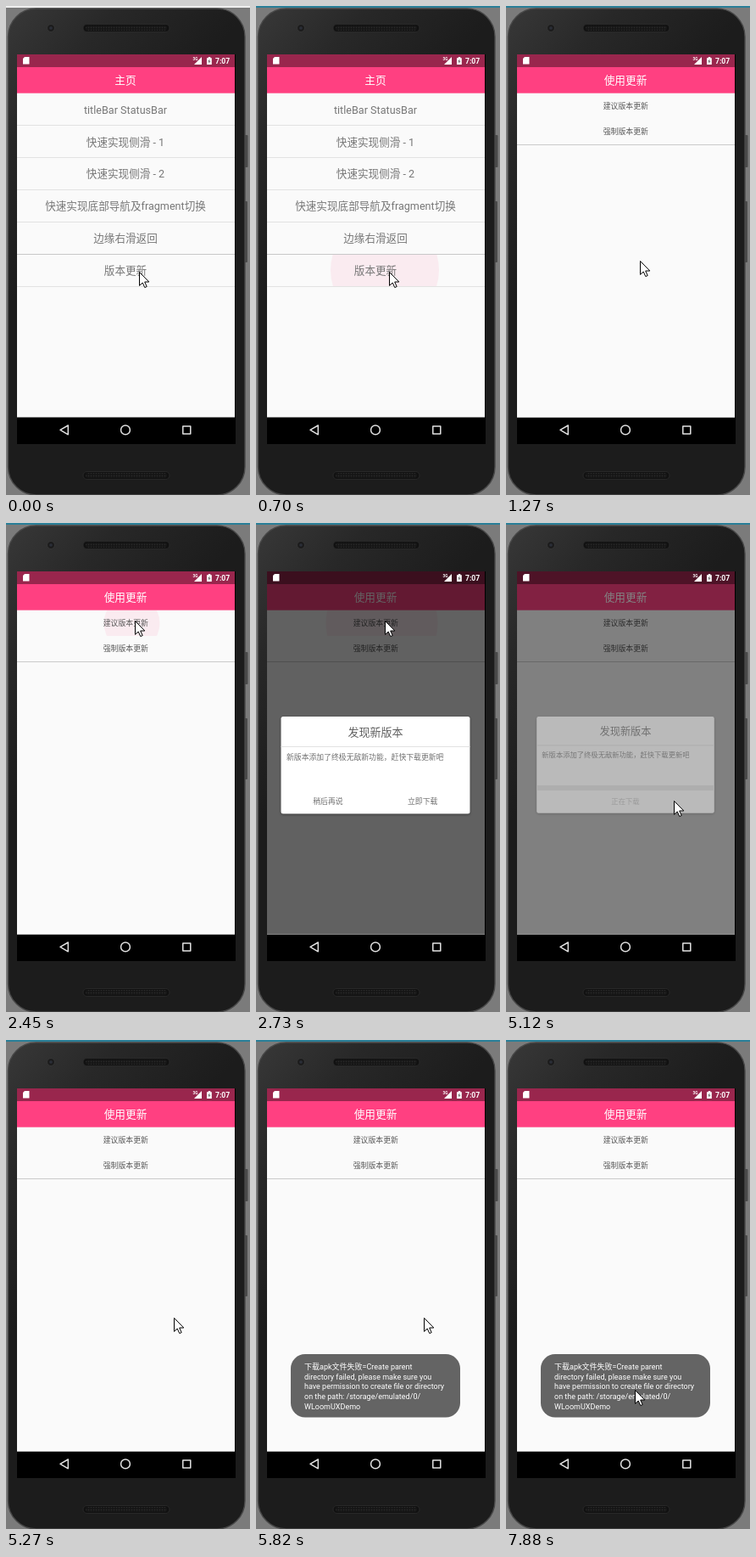
Write an HTML page that moves like this. It is 288 px wide and 576 px high and loops after 8000 ms.

```html
<!DOCTYPE html>
<html lang="zh-CN">
<head>
<meta charset="utf-8">
<title>版本更新</title>
<style>
html, body { margin: 0; width: 100%; height: 100%; overflow: hidden; background: #7b7b7b; }
svg { display: block; width: 288px; height: 576px; }
text { font-family: Roboto, 'Noto Sans CJK SC', 'Noto Sans CJK JP', 'Noto Sans CJK', sans-serif; }
.card { filter: drop-shadow(0 1px 1.5px rgba(0, 0, 0, .4)); }
</style>
</head>
<body>
<svg id="stage" viewBox="0 0 288 576" xmlns="http://www.w3.org/2000/svg"></svg>
<script>
const LOOP = 8000;
const PINK = '#ff4081';

const rect = (x, y, w, h, fill, more = '') =>
  `<rect x="${x}" y="${y}" width="${w}" height="${h}" fill="${fill}" ${more}/>`;

// Text placed by its vertical middle
const label = (str, x, mid, size, fill, more = 'text-anchor="middle"') =>
  `<text x="${x}" y="${mid + size * 0.37}" font-size="${size}" fill="${fill}" ${more}>${str}</text>`;

const speaker = y =>
  rect(91, y, 102, 9, '#111', 'rx="4.5" stroke="#2e2e2e" stroke-width=".8"') +
  rect(94, y + 1.5, 96, 6, 'url(#mesh)', 'rx="3"');

const phone = `
  ${rect(0, 0, 288, 576, '#7b7b7b')}
  ${rect(280, 152, 5.5, 38, '#4a4a4a', 'rx="1"')}
  ${rect(280, 230, 5, 72, '#4a4a4a', 'rx="1"')}
  ${rect(2.5, 3, 279.5, 573, 'url(#shell)', 'rx="33" stroke="#484848" stroke-width="1.4"')}
  <circle cx="53" cy="26" r="4.5" fill="#1c1c1c" stroke="#363636"/>
  <circle cx="53" cy="26" r="1.8" fill="#2b2f38"/>
  ${speaker(21.5)}${speaker(548.5)}
  ${rect(13, 57, 258, 459, '#000')}`;

const screen = (title, content) => `
  ${rect(13, 57, 257, 427.5, '#fafafa')}
  ${rect(13, 57, 257, 15, '#99264d')}
  ${rect(13, 72, 257, 30.7, PINK)}
  ${label(title, 141, 87.2, 12.7, '#fff', 'text-anchor="middle" font-weight="500"')}
  ${content}`;

const ripple = (id, x, y, clip) =>
  `<circle id="${id}" cx="${x}" cy="${y}" fill="${PINK}" clip-path="url(#${clip})"/>`;

const menu = ['titleBar StatusBar', '快速实现侧滑 - 1', '快速实现侧滑 - 2',
  '快速实现底部导航及fragment切换', '边缘右滑返回', '版本更新'];

const home = screen('主页', ripple('tapHome', 152, 311, 'rowHome') + menu.map((name, i) =>
  label(name, 141, 122 + i * 37.9, 12.6, '#777') +
  rect(13, 140 + i * 38, 257, 1, i === 4 ? '#c8c8c8' : '#e2e2e2')).join(''));

const update = screen('使用更新', ripple('tapUpdate', 148.5, 118, 'rowUpdate') +
  ['建议版本更新', '强制版本更新'].map((name, i) =>
    label(name, 141.3, 118 + i * 30, 8.85, '#585858')).join('') +
  rect(13, 163, 257, 1, '#cbcbcb'));

const dialog = (y, h, titleY, lineY, messageY, content) => `
  ${rect(29.5, y, 223, h, '#fff', 'rx="2.5" class="card"')}
  ${label('发现新版本', 141, titleY, 13, '#606060')}
  ${rect(29.5, lineY, 223, 1, '#e2e2e2')}
  ${label('新版本添加了终极无敌新功能，赶快下载更新吧', 36, messageY, 8.83, '#707070', '')}
  ${content}`;

const ask = dialog(228, 114.5, 246, 263, 276,
  label('稍后再说', 85, 328, 8.9, '#707070') + label('立即下载', 196.7, 328, 8.9, '#707070'));

const busy = dialog(224.4, 121, 242.6, 260, 272.3,
  rect(29.5, 310.5, 223, 6.5, '#e6e6e6') + label('正在下载', 141, 330.7, 8.9, '#bbb'));

const message = ['下载apk文件失败=Create parent', 'directory failed, please make sure you',
  'have permission to create file or directory', 'on the path: /storage/emulated/0/', 'WLoomUXDemo'];

const toast = rect(41, 370, 200, 74.5, '#646464', 'rx="17"') +
  message.map((line, i) => label(line, 57, 384.6 + i * 11.75, 9, '#fff', '')).join('');

const status = `
  <path d="M22 60H27.5V68.5H20V62Z" fill="#fff"/>
  <path d="M231 60V69H222Z" fill="#fff"/>
  ${label('3G', 220.5, 62, 4.6, '#fff', 'font-weight="700"')}
  <path d="M238.8 60H241.3V61.2H242.8V69H237V61.2H238.8Z" fill="#fff"/>
  <path d="M240.6 62.2L238.2 65.6H239.7L239.2 68L241.6 64.8H240.1Z" fill="#666"/>
  ${label('7:07', 247, 64.6, 8.6, '#fff', 'font-weight="700"')}`;

const nav = `<g fill="none" stroke="#e2e2e2" stroke-width="1.5" stroke-linejoin="round">
  <path d="M73.3 494V504.8L64 499.4Z"/>
  <circle cx="141" cy="499.4" r="5.4"/>
  <rect x="208.8" y="495" width="9" height="9"/></g>`;

const stage = document.getElementById('stage');
stage.innerHTML = `
  <defs>
    <linearGradient id="shell" x2=".6" y2="1">
      <stop stop-color="#383838"/><stop offset=".2" stop-color="#282828"/><stop offset=".45" stop-color="#1c1c1c"/>
    </linearGradient>
    <pattern id="mesh" width="3" height="3" patternUnits="userSpaceOnUse">
      <rect width="3" height="3" fill="#161616"/><circle cx="1.5" cy="1.5" r=".8" fill="#2b2b2b"/>
    </pattern>
    <clipPath id="rowHome"><rect x="13" y="293" width="257" height="37"/></clipPath>
    <clipPath id="rowUpdate"><rect x="13" y="103" width="257" height="30"/></clipPath>
  </defs>
  ${phone}
  <g id="home">${home}</g>
  <g id="update">${update}</g>
  ${rect(13, 57, 257, 427.5, '#000', 'id="dim"')}
  <g id="ask">${ask}</g>
  <g id="busy">${busy}</g>
  <g id="toast">${toast}</g>
  ${status}${nav}
  ${rect(0, 0, 288, 2, '#eee', 'id="edge"')}
  <path id="pointer" d="M.5.5V16.4L4.2 13L6.8 18.6L9.2 17.5L6.7 12H11.8Z" fill="#fff" stroke="#000"/>`;

const set = (id, attrs) => {
  const node = document.getElementById(id);
  for (const key in attrs) node.setAttribute(key, attrs[key]);
};

// Progress 0..1 in even jumps about 130 ms apart, like a screen recording
function ramp(t, start, end) {
  if (t < start) return 0;
  if (t >= end) return 1;
  const jumps = Math.round((end - start) / 130);
  return Math.floor((t - start) / (end - start) * jumps + 1.15) / (jumps + 1);
}

// Straight pointer moves after its first rest
const moves = [
  { start: 1270, end: 1270, x: 158, y: 300 },
  { start: 1420, end: 1540, x: 172, y: 169 },
  { start: 1700, end: 2000, x: 152, y: 115 },
  { start: 3000, end: 3390, x: 145, y: 290 },
  { start: 3540, end: 4020, x: 198, y: 327 },
  { start: 7340, end: 7880, x: 152, y: 412 }
];

function pointerAt(t) {
  let x = 157, y = 313;
  for (const move of moves) {
    const p = ramp(t, move.start, move.end);
    x += (move.x - x) * p;
    y += (move.y - y) * p;
  }
  return `translate(${Math.round(x)} ${Math.round(y)})`;
}

const zoom = k => `translate(141 285) scale(${k}) translate(-141 -285)`;

function draw(t) {
  const slide = ramp(t, 850, 1120);
  const enter = ramp(t, 2600, 2730);
  const leave = ramp(t, 5000, 5270);
  const shrink = leave ** 1.5;

  set('edge', { fill: t < 270 ? '#eee' : '#2a7f98' });
  set('pointer', { transform: pointerAt(t) });
  set('tapHome', { r: 64 * ramp(t, 420, 700) ** 2, 'fill-opacity': 0.08 });
  set('tapUpdate', {
    r: 66 * ramp(t, 2450, 2600),
    'fill-opacity': 0.08 * (1 - ramp(t, 2600, 5000))
  });
  set('update', { opacity: slide, transform: `translate(0 ${80 * (1 - slide) ** 3.4})` });
  set('dim', { opacity: 0.61 * enter * (1 - leave ** 4) });
  set('ask', { opacity: leave ? 0 : enter, transform: zoom(0.92 + 0.08 * enter) });
  set('busy', { opacity: leave ? 1 - shrink : 0, transform: zoom(1 - 0.11 * shrink) });
  set('toast', { opacity: ramp(t, 5520, 5820) });
}

const begin = performance.now();
function tick() {
  draw((performance.now() - begin) % LOOP);
  requestAnimationFrame(tick);
}
tick();
</script>
</body>
</html>
```
